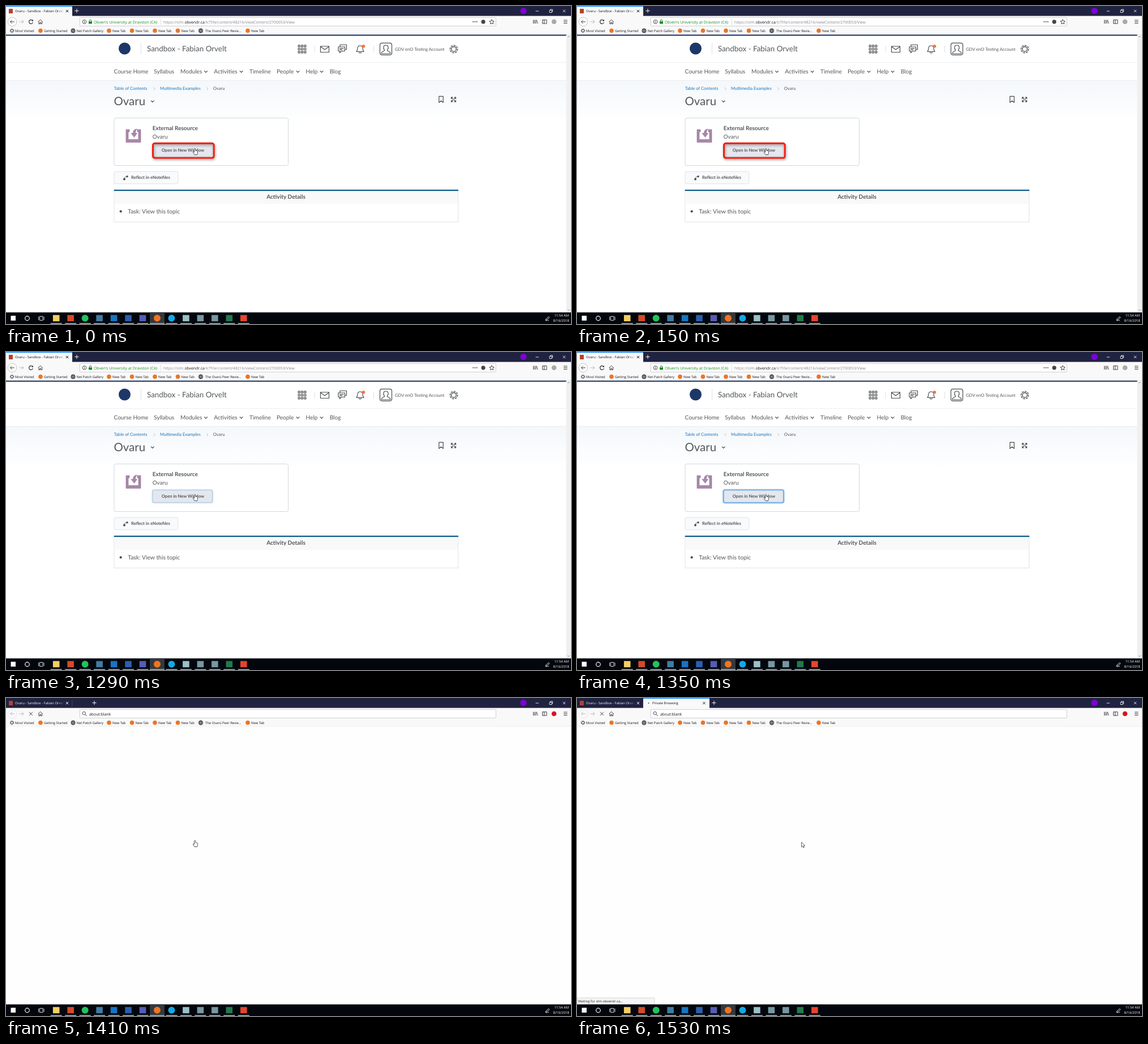
An HTML page that plays this animation: 998 px wide and 561 px high, repeating every 1.56 s.

```html
<!DOCTYPE html>
<html lang="en">
<head>
<meta charset="utf-8">
<title>Opening a resource in a new tab</title>
<style>
html, body { margin: 0; width: 100%; height: 100%; overflow: hidden; background: #fff; }
#stage { display: block; width: 998px; height: 561px; }
text { font-family: "Open Sans", "Noto Sans", sans-serif; font-size: 5.9px; text-rendering: geometricPrecision; white-space: pre; }
.address text { font-size: 6.85px; }
.page text { font-family: Lato, sans-serif; font-size: 10.1px; fill: #53575a; }
.page .small { font-size: 7.65px; }
.page .link { fill: #1b72ba; }
.page .bold { font-weight: 700; }
.line { fill: none; stroke: #494c4e; stroke-width: 1.2; stroke-linejoin: round; stroke-linecap: round; }
.thin { fill: none; stroke: #303034; stroke-width: .9; }
.light { stroke: #eee; }
</style>
</head>
<body>
<svg id="stage" viewBox="0 0 998 561">
  <defs>
    <linearGradient id="sky" x2="0" y2="1"><stop stop-color="#f4f8fb"/><stop offset="1" stop-color="#fff"/></linearGradient>
    <linearGradient id="fade"><stop offset=".88" stop-color="#fff"/><stop offset="1"/></linearGradient>
    <mask id="titleFade" maskUnits="userSpaceOnUse" x="14" y="0" width="88" height="18"><rect x="14" width="88" height="18" fill="url(#fade)"/></mask>
    <path id="chevron" class="line" d="M-2.5-1.2L0 1.2 2.5-1.2"/>
    <path id="close" d="M-2.2-2.2l4.4 4.4m0-4.4l-4.4 4.4"/>
    <path id="plus" d="M-3.6 0h7.2M0-3.6v7.2"/>
    <g id="globe" class="thin" stroke-width=".8"><circle r="3.7"/><ellipse rx="1.6" ry="3.7"/><path d="M-3.7 0h7.4M-3.1-2h6.2M-3.1 2h6.2"/></g>
    <g id="cog" fill="none"><circle r="2.2"/><circle r="3.4" stroke-dasharray="1.33 1.33"/></g>
  </defs>

  <rect width="998" height="18" fill="#202340"/>
  <g id="activeTab"><rect width="117" height="18" fill="#f9f9fa"/><rect width="117" height="1.2" fill="#0a84ff"/></g>
  <g id="firstTab">
    <rect x="5" y="5" width="7" height="8" fill="#b5412f" stroke="none"/>
    <text x="16" y="11" mask="url(#titleFade)" fill="currentColor">Ovaru - Sandbox - Fabian Orvelt</text>
    <use href="#close" x="108" y="9" stroke="currentColor"/>
  </g>
  <path id="tabEdge" d="M117 3v12" stroke="#55576d" stroke-width=".6"/>
  <svg id="newTab" x="117" height="18">
    <g id="newTabBody">
      <rect width="117" height="18" fill="#f9f9fa"/><rect width="117" height="1.2" fill="#0a84ff"/>
      <circle cx="9.5" cy="9" r="1" fill="#444"/>
      <text x="16" y="11" fill="#111">Private Browsing</text>
      <use href="#close" x="107.5" y="9" stroke="#222"/>
    </g>
  </svg>
  <use id="addTab" href="#plus" y="8.5" stroke="#eee"/>
  <circle cx="914" cy="8.5" r="5.6" fill="#8000d7"/>
  <g class="thin light"><path d="M935.500 9h5.500M960 7.500h4v4h-4zM961.500 7.500v-1.500h4v4h-1.500"/><use href="#close" x="986" y="8.800"/></g>

  <rect y="17.500" width="998" height="33" fill="#f9f9fa"/>
  <path d="M0 50.200h998" stroke="#dcdcde" stroke-width=".6"/>
  <g id="back"><circle cx="11" cy="27.800" r="7.800" fill="#fff" stroke="#aaa" stroke-width=".7"/><path class="thin" stroke-width="1.200" d="M15 27.800H7.500m3.200-3.200l-3.200 3.200 3.200 3.200"/></g>
  <path class="thin" opacity=".35" d="M23.500 27.800h7.500m-3.200-3.200l3.200 3.200-3.200 3.200"/>
  <g id="reload" class="thin"><path stroke-width="1.200" d="M47 25.800a3.500 3.500 0 1 0 .5 3"/><path d="M48 23.800v3h-3z" fill="#303034" stroke="none"/></g>
  <path id="stop" class="thin" stroke-width="1.300" d="M41 24.800l6 6m0-6l-6 6"/>
  <path class="thin" stroke-width="1.100" d="M56.700 28l4-4 4 4M58 27.500v4h2v-2.500h1.600v2.500h2v-4"/>
  <rect x="130.300" y="20.300" width="735" height="15" rx="1" fill="#fff" stroke="#c4c4c8" stroke-width=".8"/>
  <g id="siteAddress" class="address">
    <circle class="thin" cx="138.500" cy="27.800" r="3.300" stroke-width=".7"/><path class="thin" d="M138.500 27.200v2.500m0-4v.8"/>
    <path d="M146 27.300h6v4h-6z" fill="#12881c"/><path d="M147.300 27.500v-1.500a1.700 1.700 0 0 1 3.400 0v1.500" fill="none" stroke="#12881c"/>
    <text x="155" y="30.500" fill="#12881c">Obven's University at Dravston (CA)</text>
    <path d="M273.500 22.500v11" stroke="#ccc" stroke-width=".7"/>
    <text x="278" y="30.500" fill="#85858a">https://olm.<tspan fill="#111">obvendr.ca</tspan>/k7f/le/content/48216/viewContent/2700053/View</text>
    <g fill="#444"><circle cx="825.300" cy="27.800" r="1"/><circle cx="828.500" cy="27.800" r="1"/><circle cx="831.700" cy="27.800" r="1"/><circle cx="843" cy="27.800" r="3.600"/></g>
    <path class="thin" d="M858 23.700l1.200 2.800 3 .3-2.300 2 .7 3-2.600-1.600-2.600 1.600 .7-3-2.300-2 3-.3z"/>
  </g>
  <g id="blankAddress" class="address"><circle class="thin" cx="137.800" cy="26.800" r="2.600"/><path class="thin" d="M139.800 28.800l3 3"/><text x="147" y="30.500" fill="#111">about:blank</text></g>
  <path class="thin" stroke-width="1.100" d="M931.500 24.500v6.500m2.200-6.500v6.500m2.200-6.500v6.500m1.300-6.300l2 6.300M947.500 24.500h7.500v6.500h-7.500zM950.500 24.500v6.500M985 25h6.500m-6.500 2.700h6.500m-6.500 2.700h6.500"/>
  <circle id="addon" cx="968" cy="27.800" r="4.300"/>
  <g id="bookmarks" fill="#16161a"><use href="#cog" x="10.500" y="43.600" stroke="#333" stroke-width="1"/></g>

  <g id="sitePage" class="page">
    <rect y="50.500" width="990" height="490" fill="#fff"/>
    <rect y="131" width="990" height="76" fill="url(#sky)"/>
    <path d="M0 99.500h990M0 131.300h990" stroke="#e6eaf0" stroke-width=".8"/>
    <rect y="50.500" width="990" height="2" fill="#17315f"/>
    <rect x="989.500" y="50.500" width="8.500" height="490" fill="#f0f0f0"/>
    <path d="M992 55l1.800-1.800 1.800 1.800M992 535.500l1.800 1.800 1.800-1.800" class="thin" opacity=".6"/>
    <circle cx="209.500" cy="75" r="10.500" fill="#1d3768"/>
    <path d="M238.500 65v20M545 70v12M649.500 70v12" stroke="#d5dae1" stroke-width=".8"/>
    <text x="249" y="80" style="font-size:13.400px">Sandbox - Fabian Orvelt</text>
    <g id="grid" class="line"></g>
    <g class="line">
      <path d="M555.500 71h15v10.500h-15zM555.500 71.500l7.500 5.500 7.500-5.500"/>
      <path d="M590 72v-3.500h11.500v8h-2.500M587 72h11.500v7.500h-6l-3 3v-3h-2.500zM589.500 74.800h6.500m-6.500 2.300h4"/>
      <path d="M619 80.500c2-2 1.500-4 2-6.500 .5-2.500 2-4 4.500-4s4 1.500 4.500 4c.5 2.500 0 4.500 2 6.500zM623.500 81c.5 3 3.500 3 4 0"/>
      <rect x="660.500" y="65.300" width="21" height="21" rx="3.500"/>
      <path d="M663 84c0-3.500 3-4 5-5 1-.6 .5-1.500 0-2-2-3-1.500-8 3-8s5 5 3 8c-.5 .5-1 1.400 0 2 2 1 5 1.500 5 5z"/>
      <use href="#cog" transform="translate(791 76) scale(1.950)" stroke-width=".7"/>
    </g>
    <circle cx="631.500" cy="71" r="2.800" fill="#f4743b"/>
    <text class="small" x="687" y="78.700">GDV enO Testing Account</text>
    <g id="nav"></g>
    <text class="small link" x="190.700" y="148">Table of Contents</text>
    <text class="small link" x="272" y="148">Multimedia Examples</text>
    <text class="small" x="365.700" y="148">Ovaru</text>
    <path d="M261 143.500l1.800 2.300-1.800 2.300M354.800 143.500l1.800 2.300-1.800 2.300" fill="none" stroke="#9aa2a8" stroke-width=".7"/>
    <text x="190.500" y="175.300" style="font-size:20.400px">Ovaru</text>
    <use href="#chevron" x="258.800" y="168.300"/>
    <path class="line" d="M764.800 159.300h7.400v11l-3.700-3-3.700 3z"/>
    <path class="line" d="M786.500 163.500v-2.500h2.500m-2.500 0l3 3M794.500 163.500v-2.500h-2.500m2.500 0l-3 3M786.500 166.500v2.500h2.500m-2.500 0l3-3M794.500 166.500v2.500h-2.500m2.500 0l-3-3"/>

    <rect x="191" y="197.500" width="307.500" height="84" rx="3" fill="#fff" stroke="#cdd3da" stroke-width=".9"/>
    <path d="M212 218h6v4h-2v13.500h18v-13.500h-2v-4h6v22.500h-26z" fill="#a988aa" stroke="#8a6c8d" stroke-width=".6"/>
    <path d="M231.500 217c-5 .5-7 3-7 7.500h-3.500l5.500 7 5-7h-3c0-3 .5-5 3-7.500z" fill="#a988aa" stroke="#8a6c8d" stroke-width=".6"/>
    <text class="bold" x="258.700" y="218.700" style="font-size:10px">External Resource</text>
    <text x="258.700" y="234.300" style="font-size:9.900px">Ovaru</text>
    <rect x="259" y="243.800" width="105.500" height="21.700" rx="2.500" fill="#e4e8ee" stroke="#cdd5de" stroke-width=".8"/>
    <rect id="focusRing" x="258.500" y="243.300" width="106.700" height="22.700" rx="3" fill="none" stroke="#69a7df" stroke-width="1.600" style="filter:drop-shadow(0 0 1px #8bbcec)"/>
    <text class="small bold" x="274.700" y="256.700">Open in New Window</text>
    <rect id="highlight" x="259.500" y="242.300" width="107.700" height="25.800" rx="3.500" fill="none" stroke="#f71a0c" stroke-width="3" style="filter:drop-shadow(1px 2px 2px #0006)"/>

    <rect x="191" y="292" width="112.800" height="21.700" rx="2.500" fill="#f9fafc" stroke="#d5dae2" stroke-width=".8"/>
    <path d="M209 305.500c0-3 1.500-4.500 4.500-4.500" fill="none" stroke="#494c4e" stroke-width=".9"/>
    <circle cx="209" cy="305.500" r="2" fill="#494c4e"/><circle cx="214" cy="300.700" r="1.700" fill="#494c4e"/>
    <text class="small bold" x="221" y="305">Reflect in eNotefiles</text>

    <rect x="191" y="325" width="607.700" height="56" fill="#fff" stroke="#dcdfe3" stroke-width=".9"/>
    <rect x="191.500" y="326" width="606.700" height="23" fill="#f9f9f9"/>
    <rect x="190.700" y="324" width="608.300" height="2.200" fill="#07598b"/>
    <text class="bold" x="494.500" y="340.300" text-anchor="middle">Activity Details</text>
    <circle cx="202.700" cy="362.300" r="2.100" fill="#494c4e"/>
    <text x="215.300" y="366.300" style="font-size:10.350px">Task: View this topic</text>
  </g>
  <rect id="blankPage" y="50.500" width="998" height="490"/>
  <g id="status"><path d="M0 529h137v12H0z" fill="#f5f5f6" stroke="#c8c8cb" stroke-width=".7"/><text x="2" y="537" fill="#222">Waiting for olm.obvendr.ca...</text></g>

  <rect y="540.500" width="998" height="20.500" fill="#03070d"/>
  <g id="taskbar">
    <rect x="8.500" y="546.500" width="8.500" height="8.500" fill="#fff"/>
    <circle cx="37.500" cy="551" r="3.800" fill="none" stroke="#fff" stroke-width="1.200"/>
    <path class="thin light" d="M59.500 547.500h5.500v7h-5.500zM57.500 548v6m9.500-6v6"/>
    <path class="thin light" d="M953 554.500l1-2.500 4.500-4 1.500 1.500-4.500 4zM953 554.500c3 1.500 4-1 6 0"/>
  </g>
  <g fill="#fff" text-anchor="end"><text x="994" y="548">11:54 AM</text><text x="994.500" y="557.300">8/16/2018</text></g>

  <path id="hand" d="M333 251.500c1-.8 1.700 0 1.700 .8v2.700l3 .7c.8 .2 1 .8 .9 1.600l-.5 3.200-.7 2h-4.200l-2.700-4c-.5-1 .5-1.700 1.300-.9l.7 .6v-5.500z" fill="#fff" stroke="#222" stroke-width=".8"/>
  <path id="arrow" d="M0 0v8.700l2-1.900 1.400 3.200 1.400-.6-1.400-3.100h2.700z" fill="#fff" stroke="#222" stroke-width=".7"/>
</svg>
<script>
const LOOP = 1560, TICK = 30;
const $ = id => document.getElementById(id);
const clamp = v => Math.max(0, Math.min(1, v));
const show = (id, on) => $(id).style.display = on ? '' : 'none';

function add(parent, tag, attrs, text = '') {
  const node = document.createElementNS('http://www.w3.org/2000/svg', tag);
  for (const key in attrs) node.setAttribute(key, attrs[key]);
  node.textContent = text;
  $(parent).append(node);
}

// Bookmarks: label, text x, icon x, icon kind
[['Most Visited', 16], ['Getting Started', 67, 61, 'dot'], ['Net Patch Gallery', 124.5, 118.5, 'globe'],
 ...[0, 1, 2, 3].map(i => ['New Tab', 188 + 40.5 * i, 182 + 40.5 * i, 'dot']),
 ['The Ovarü Peer Revie...', 352, 344, 'globe'], ['New Tab', 433, 427, 'dot']
].forEach(([label, x, iconX, kind]) => {
  add('bookmarks', 'text', { x, y: 45.7 }, label);
  if (kind === 'dot') add('bookmarks', 'circle', { cx: iconX, cy: 43.6, r: 3.8, fill: '#ef7422' });
  if (kind === 'globe') add('bookmarks', 'use', { href: '#globe', x: iconX, y: 43.6 });
});

// Navigation: label, text x, chevron x
[['Course Home', 190.5], ['Syllabus', 261.3], ['Modules', 308, 353], ['Activities', 367.3, 415.7],
 ['Timeline', 430], ['People', 478, 515.5], ['Help', 529.5, 557.5], ['Blog', 571.7]
].forEach(([label, x, chevronX]) => {
  add('nav', 'text', { x, y: 118.5 }, label);
  if (chevronX) add('nav', 'use', { href: '#chevron', x: chevronX, y: 115.8 });
});

for (let i = 0; i < 9; i++)
  add('grid', 'rect', { x: 516.2 + i % 3 * 5.3, y: 69.2 + Math.floor(i / 3) * 5.3, width: 3, height: 3 });

const round = [2, 7, 8], active = 7;
['#f5cf63', '#d64a27', '#1fc45d', '#437ba3', '#1675c4', '#2b5fae', '#585cb5',
 '#ef7422', '#13a8e8', '#9bc0c8', '#7997a0', '#7997a0', '#217a4b', '#e8442c'
].forEach((fill, i) => {
  const x = 88.7 + 25.47 * i, half = i === active ? 13 : 10;
  if (i === active) add('taskbar', 'rect', { x: x - 13, y: 540.5, width: 26, height: 20.5, fill: '#34383d' });
  if (round.includes(i)) add('taskbar', 'circle', { cx: x, cy: 550.7, r: 6, fill });
  else add('taskbar', 'rect', { x: x - 5.8, y: 545.2, width: 11.6, height: 11, fill });
  add('taskbar', 'rect', { x: x - half, y: 559.4, width: half * 2, height: 1.6, fill: '#72b5e8' });
});

function draw(now) {
  const t = Math.floor(now % LOOP / TICK) * TICK;
  const opened = t >= 1380, loading = t >= 1410, moving = t > 1410;

  show('highlight', t < 1230);
  $('focusRing').style.opacity = clamp((t - 1260) / 90);

  for (const id of ['sitePage', 'siteAddress', 'activeTab']) show(id, !opened);
  for (const id of ['blankPage', 'blankAddress', 'tabEdge']) show(id, opened);
  $('blankPage').setAttribute('fill', loading ? '#fefefe' : '#270641');
  $('firstTab').style.color = opened ? '#f2f2f5' : '#16161a';
  $('back').style.opacity = opened ? .35 : 1;
  $('addon').setAttribute('fill', opened ? '#d9151b' : '#a9a9ac');
  show('reload', !loading);
  show('stop', loading);
  show('status', t >= 1530);

  const tabWidth = 117 * clamp((t - 1380) / 113);
  $('newTab').setAttribute('width', tabWidth);
  $('newTabBody').style.opacity = clamp((t - 1410) / 60);
  $('addTab').setAttribute('x', 125 + tabWidth);

  const p = clamp((t - 1410) / 120), ease = p * p * (3 - 2 * p);
  show('hand', !moving);
  show('arrow', moving);
  $('arrow').setAttribute('transform', `translate(${333 + 63.5 * ease} ${251.5 + 2.8 * ease})`);
}

function frame(now) {
  draw(now);
  requestAnimationFrame(frame);
}
draw(0);
requestAnimationFrame(frame);
</script>
</body>
</html>
```
